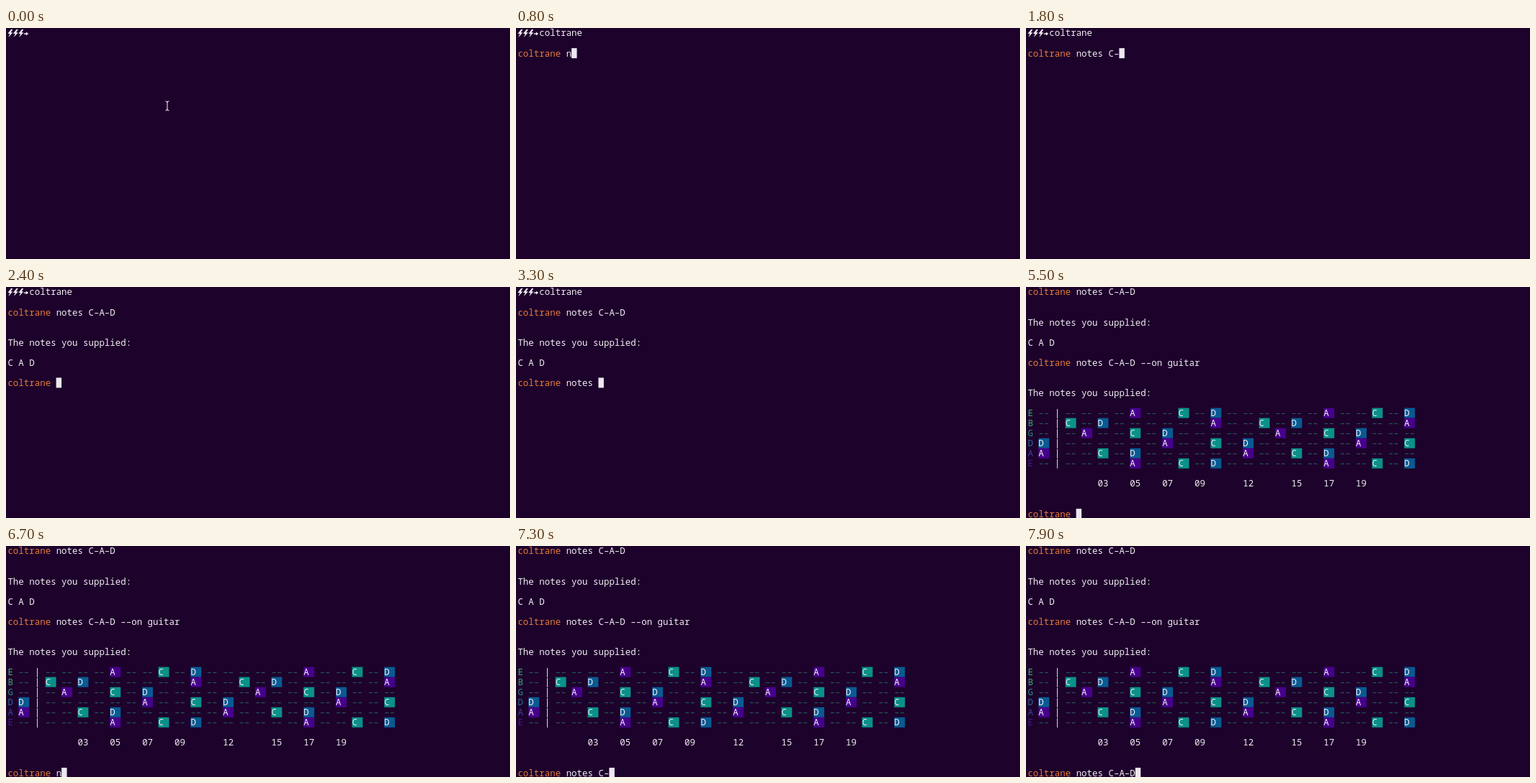
Write an HTML page with a canvas that moves like this. It is 700 px wide and 322 px high and loops after 8 s.

```html
<!DOCTYPE html>
<html lang="en">
<head>
<meta charset="utf-8">
<title>Terminal session</title>
<style>
html, body { margin: 0; width: 100%; height: 100%; overflow: hidden; background: #1d022b; }
canvas { display: block; width: 700px; height: 322px; }
</style>
</head>
<body>
<canvas id="stage"></canvas>
<script>
const W = 700, H = 322, LOOP = 8000;
const CELL = 7.47, LINE = 14.05, LEFT = 2.4, BASE = 11.4, BLINK = 600;
const BG = '#1d022b', TEXT = '#f3edf4', ORANGE = '#e57b3c', CURSOR = '#eee6f0', DASH = '#27605f';
const RESULT = 2400, BOARD = 5500;

// Typing log per prompt line: row, first column, [time, text so far]...
const prompts = [
  [0, 4, [-600, ''], [100, 'c'], [200, 'col'], [300, 'coltr'], [400, 'coltran'], [500, 'coltrane']],
  [2, 9, [600, ''], [800, 'n'], [900, 'not'], [1000, 'notes'], [1100, 'notes c'], [1300, 'notes C'],
    [1500, 'notes C-a'], [1800, 'notes C-'], [1900, 'notes C-A'], [2100, 'notes C-A-'], [2200, 'notes C-A-D']],
  [9, 9, [RESULT, ''], [3100, 'no'], [3200, 'note'], [3300, 'notes '], [3500, 'notes C-'],
    [3700, 'notes C-A'], [3800, 'notes C-A-'], [3900, 'notes C-A-D'], [4200, 'notes C-A-D -'],
    [4300, 'notes C-A-D --'], [5000, 'notes C-A-D --o'], [5100, 'notes C-A-D --on'],
    [5200, 'notes C-A-D --on g'], [5300, 'notes C-A-D --on gui'], [5400, 'notes C-A-D --on guitar']],
  [24, 9, [BOARD, ''], [6700, 'n'], [6800, 'not'], [6900, 'note'], [7000, 'notes '], [7200, 'notes C-'],
    [7400, 'notes C-A'], [7500, 'notes C-A-'], [7600, 'notes C-A-D']]
];

// Guitar strings: name, pitch class when open, label colour
const strings = [
  ['E', 4, '#43ab7c'], ['B', 11, '#3f9f83'], ['G', 7, '#2c8c86'],
  ['D', 2, '#2b669f'], ['A', 9, '#3a41a6'], ['E', 4, '#431b98']
];
const notes = { 0: ['C', '#0a918a'], 2: ['D', '#085b92'], 9: ['A', '#47008d'] };
const markers = [3, 5, 7, 9, 12, 15, 17, 19];

const canvas = document.getElementById('stage');
const ctx = canvas.getContext('2d');
const ratio = window.devicePixelRatio || 1;
canvas.width = W * ratio;
canvas.height = H * ratio;

const xOf = col => LEFT + col * CELL;

function write(row, col, text, color = TEXT) {
  ctx.fillStyle = color;
  // The terminal face has wide hyphens
  [...text.replaceAll('-', '–')].forEach((ch, i) => ctx.fillText(ch, xOf(col + i), row * LINE + BASE));
}

function block(row, col, cells, color) {
  ctx.fillStyle = color;
  ctx.fillRect(xOf(col), row * LINE, cells * CELL, LINE);
}

function polygon(x, y, points) {
  ctx.beginPath();
  points.forEach(([px, py]) => ctx.lineTo(x + px, y + py));
  ctx.fill();
}

function shellPrompt() {
  ctx.fillStyle = TEXT;
  for (let i = 0; i < 3; i++) {
    polygon(xOf(i), 0, [[4.6, 2], [0, 8], [2.9, 8], [1, 13], [7, 6.3], [4.2, 6.3], [7, 2]]);
  }
  ctx.fillRect(24.8, 7.4, 3.6, 1.4);
  polygon(27.8, 5.6, [[0, 0], [3.4, 2.5], [0, 5]]);
}

function mousePointer() {
  ctx.strokeStyle = '#d8d0da';
  ctx.lineWidth = 1.2;
  ctx.stroke(new Path2D('M221.5 102Q224 102 224 104.5Q224 102 226.5 102M224 104V113M221.5 115Q224 115 224 112.5Q224 115 226.5 115'));
}

function fretboard(top) {
  strings.forEach(([name, open, color], i) => {
    const row = top + i;
    write(row, 0, name, color);
    write(row, 5, '|');
    for (let fret = 0; fret <= 22; fret++) {
      const col = fret ? 4 + 3 * fret : 2;
      const note = notes[(open + fret) % 12];
      if (note) {
        block(row, col, 2, note[1]);
        write(row, col, note[0]);
      } else {
        write(row, col, '--', DASH);
      }
    }
  });
  markers.forEach(f => write(top + 7, 4 + 3 * f, String(f).padStart(2, '0')));
}

function draw(t) {
  ctx.setTransform(ratio, 0, 0, ratio, 0, 0);
  ctx.fillStyle = BG;
  ctx.fillRect(0, 0, W, H);
  ctx.font = '12.45px "Noto Sans Mono", "DejaVu Sans Mono", monospace';
  if (t < 100) mousePointer();
  if (t >= BOARD) ctx.translate(0, -2 * LINE);

  shellPrompt();
  let cursor;
  for (const [row, col, ...log] of prompts) {
    const last = log.filter(([time]) => time <= t).pop();
    if (!last) break;
    if (row) write(row, 0, 'coltrane', ORANGE);
    write(row, col, last[1]);
    cursor = [row, col + last[1].length, last[0]];
  }
  if (t >= RESULT) {
    write(5, 0, 'The notes you supplied:');
    write(7, 0, 'C A D');
  }
  if (t >= BOARD) {
    write(12, 0, 'The notes you supplied:');
    fretboard(14);
  }
  const [row, col, since] = cursor;
  if (Math.floor((t - since) / BLINK) % 2 === 0) block(row, col, 1, CURSOR);
}

function frame(now) {
  draw(now % LOOP);
  requestAnimationFrame(frame);
}
requestAnimationFrame(frame);
</script>
</body>
</html>
```
